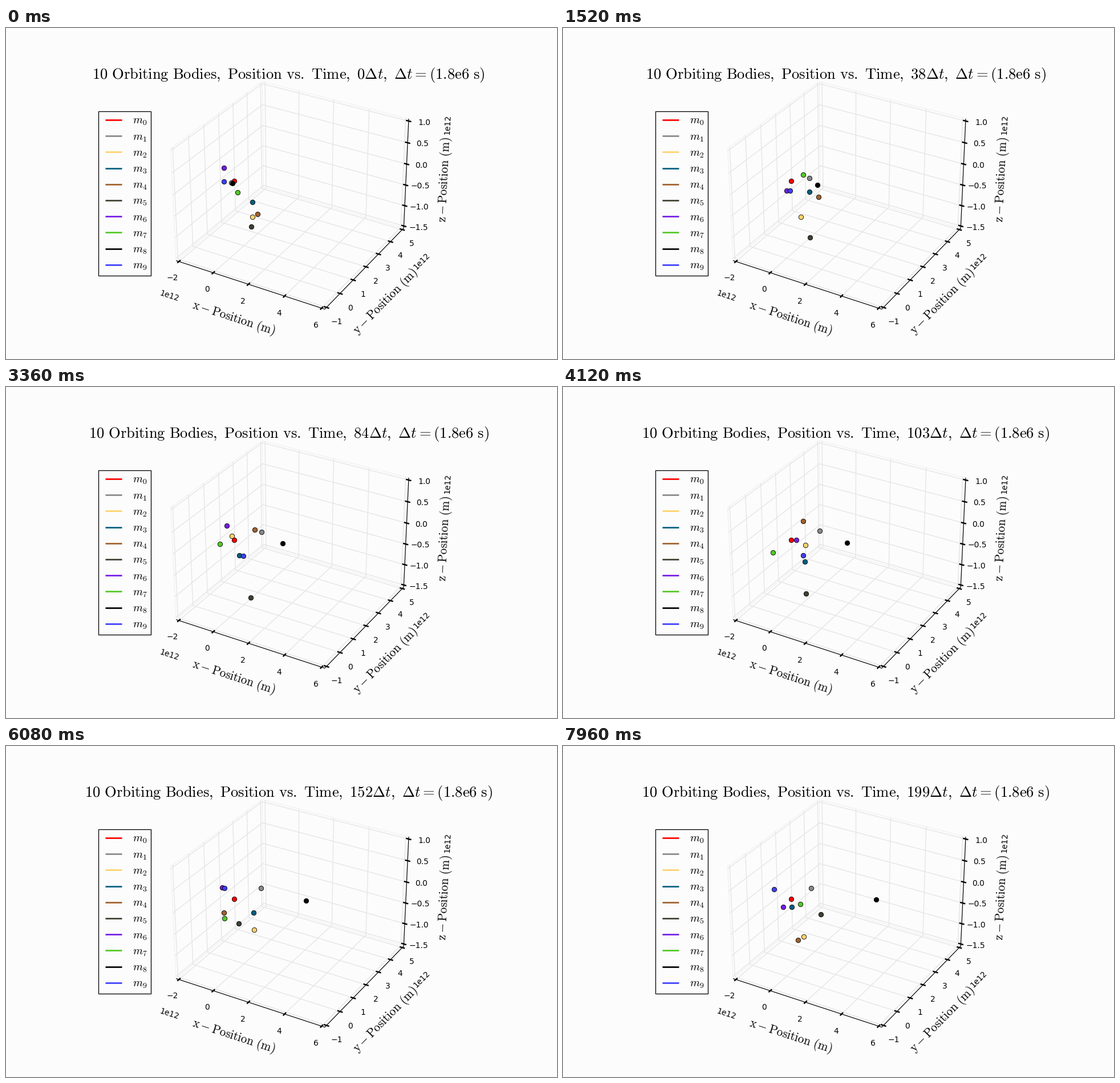
Animation, 966 px wide and 580 px high, one loop 8 s. Source, as a matplotlib script:

```python
import numpy as np
import matplotlib.pyplot as plt
from matplotlib.animation import FuncAnimation
from matplotlib.collections import LineCollection
from matplotlib.patches import Rectangle

W, H, DPI, FRAMES = 966, 580, 100, 200
PX = 72 / DPI
BG = "#fcfcfc"
COLORS = ["#ff0000", "#888888", "#ffd36b", "#005f80", "#a0612d",
          "#3f4033", "#761ce8", "#53c926", "#000000", "#3f3fff"]

plt.rcParams["font.family"] = "DejaVu Sans"
plt.rcParams["mathtext.fontset"] = "cm"

fig = plt.figure(figsize=(W / DPI, H / DPI), dpi=DPI, facecolor=BG)
ax = fig.add_axes([0, 0, 1, 1])
ax.set_xlim(0, W)
ax.set_ylim(H, 0)
ax.axis("off")


# ---- camera -----------------------------------------------------------
BOX = np.array([4, 4, 3]) * 1.8294640721620434 / np.sqrt(41)
AZ, EL, DIST = np.radians(-60), np.radians(30), 10
EYE = np.array([np.cos(AZ) * np.cos(EL), np.sin(AZ) * np.cos(EL), np.sin(EL)])
RIGHT = np.array([-np.sin(AZ), np.cos(AZ), 0])
UP = np.cross(EYE, RIGHT)
SCALE = 0.8 * H / 0.185


def project(*p):
    """Screen position of a point given in unit box coordinates."""
    v = (np.array(p) - 0.5) * BOX
    k = SCALE / (DIST - v @ EYE)
    return 501.4 + k * (v @ RIGHT), 283.7 - k * (v @ UP)


def lines(paths, color, width, **kw):
    segs = [[project(*p) for p in path] for path in paths]
    ax.add_collection(LineCollection(segs, colors=color, linewidths=width * PX, **kw))


def put(s, x, y, size, rot=0, drop=5.0, ha="center"):
    """Text whose baseline lies `drop` pixels below (x, y) in its own frame."""
    a = np.radians(rot)
    return ax.text(x + drop * np.sin(a), y + drop * np.cos(a), s, size=size,
                   rotation=rot, rotation_mode="anchor", ha=ha, va="baseline")


# ---- box, grid, ticks -------------------------------------------------
lo, hi = -1 / 48, 49 / 48
xt, yt, zt = (np.linspace(0, 1, n) for n in (5, 7, 6))

panes = [
    [(lo, lo, lo), (lo, hi, lo), (lo, hi, hi), (lo, lo, hi), (lo, lo, lo)],
    [(lo, hi, lo), (hi, hi, lo), (hi, hi, hi), (lo, hi, hi)],
]
grid = [[(x, lo, lo), (x, hi, lo), (x, hi, hi)] for x in xt]
grid += [[(hi, y, lo), (lo, y, lo), (lo, y, hi)] for y in yt]
grid += [[(lo, lo, z), (lo, hi, z), (hi, hi, z)] for z in zt]
d = 0.018
ticks = [[(x, lo - d, lo), (x, lo + d, lo)] for x in xt]
ticks += [[(hi - d, y, lo), (hi + d, y, lo)] for y in yt]
ticks += [[(hi - d, hi, z), (hi + d, hi, z)] for z in zt]

lines(panes, "#efefef", 1.0, zorder=1)
lines(grid, "#e6e6e6", 1.4, zorder=1)
lines([[(lo, lo, lo), (hi, lo, lo), (hi, hi, lo), (hi, hi, hi)]], "black", 1.2, zorder=2)
lines(ticks, "black", 2.4, zorder=2)


def tick_labels(names, first, last, bend):
    """Labels spread from first to last, with a slight bow for perspective."""
    for s, u in zip(names, np.linspace(0, 1, len(names))):
        bow = 4 * u * (1 - u)
        x, y = (a + (b - a) * u + c * bow for a, b, c in zip(first, last, bend))
        put(s.replace("-", "−"), x, y, 10)


tick_labels([f"{v}" for v in range(-2, 7, 2)], (292, 437), (543, 520), (-2.5, -0.5))
tick_labels([f"{v}" for v in range(-1, 6)], (580, 514), (711, 377), (2.5, -2.5))
tick_labels([f"{v / 2:.1f}" for v in range(-3, 3)], (723, 349), (733, 165), (-1, 1))

RX, RY, RZ = -18, 45.6, 87.3
for name, x, y, rot in (("x", 399, 509, RX), ("y", 665, 480, RY), ("z", 769.5, 266, RZ)):
    put(r"$\mathrm{%s-Position\ (m)}$" % name, x, y, 15.3, rot, 5.3)
for x, y, rot in ((287, 469, RX), (728, 408, RY), (773.5, 169, RZ)):
    put("1e12", x, y, 10, rot)

# ---- legend -----------------------------------------------------------
ax.add_patch(Rectangle((162, 146), 92, 288, fc=BG, ec="black", lw=1.3 * PX))
for i, c in enumerate(COLORS):
    y = 161 + 28.2 * i
    ax.plot([174, 203], [y, y], color=c, lw=2.7 * PX, solid_capstyle="butt")
    put("$m_%d$" % i, 222.5, y, 14, drop=7, ha="left")


# ---- orbits -----------------------------------------------------------
STAR = np.array([400, 268])
STEPS = np.arange(FRAMES)
# body: period, eccentricity, closest pass, major and minor half axis on screen
ORBITS = {
    1: (300, 0.75, -1.5, (-27, 11), (12, 3)),
    2: (171, 0.80, 84, (-17.8, -34.7), (11.8, -16.6)),
    3: (121, 0.90, 75.3, (-18, -17), (-3, 16)),
    4: (255, 0.503, 133.5, (-28.8, -36.1), (-17.6, 41.6)),
    6: (78, 0.48, 26.5, (16.3, 8.2), (-3, 19.9)),
    7: (185, 0.35, 53, (15.2, -25.4), (-22.6, 2.3)),
    8: (1200, 0.95, -3, (-117, 8.7), (-5.5, 13.1)),
    9: (245, 0.56, 136.2, (8, -4.5), (-24.4, -25.6)),
}
# body 5 falls in and is flung out again: step, x, y
SWING = np.array([
    (0, 430, 348), (38, 433, 367), (103, 425.5, 362), (133, 416.5, 339),
    (152, 408, 311), (166, 399, 272), (178, 426, 276), (199, 452, 295)])


def orbit(period, e, closest, major, minor):
    """Kepler motion around the star, the anomaly found by bisection."""
    m = 2 * np.pi * (STEPS - closest) / period
    m = (m + np.pi) % (2 * np.pi) - np.pi
    ecc, step = np.zeros(FRAMES), np.pi / 2
    for _ in range(30):
        ecc += step * np.sign(m - ecc + e * np.sin(ecc))
        step /= 2
    return STAR + np.outer(np.cos(ecc) - e, major) + np.outer(np.sin(ecc), minor)


def smooth_path(keys):
    """Cubic Hermite curve through timed places."""
    kt, p = keys[:, 0], keys[:, 1:]
    v = np.gradient(p, kt, axis=0)
    i = np.clip(np.searchsorted(kt, STEPS, side="right") - 1, 0, len(kt) - 2)
    h = (kt[i + 1] - kt[i])[:, None]
    u = (STEPS - kt[i])[:, None] / h
    return ((1 + 2 * u) * (1 - u) ** 2 * p[i] + u * (1 - u) ** 2 * h * v[i]
            + u ** 2 * (3 - 2 * u) * p[i + 1] + u ** 2 * (u - 1) * h * v[i + 1])


tracks = {i: orbit(*elements) for i, elements in ORBITS.items()}
tracks[0] = np.tile(STAR, (FRAMES, 1))
tracks[5] = smooth_path(SWING)

dots = [ax.plot([], [], "o", ms=6, mfc=c, mec="black", mew=0.6, zorder=5 + i)[0]
        for i, c in enumerate(COLORS)]
title = put("", 495.7, 80, 19.15, drop=9)


def update(n):
    title.set_text(r"$\mathrm{10\ Orbiting\ Bodies,\ Position\ vs.\ Time,\ %d}"
                   r"\Delta t,\ \Delta t=\mathrm{(1.8e6\ s)}$" % n)
    for i, dot in enumerate(dots):
        x, y = tracks[i][n]
        dot.set_data([x], [y])
    return [title, *dots]


update(0)
anim = FuncAnimation(fig, update, frames=FRAMES, interval=40, repeat=True,
                     repeat_delay=0, init_func=lambda: update(0), blit=False)
plt.show()
```
